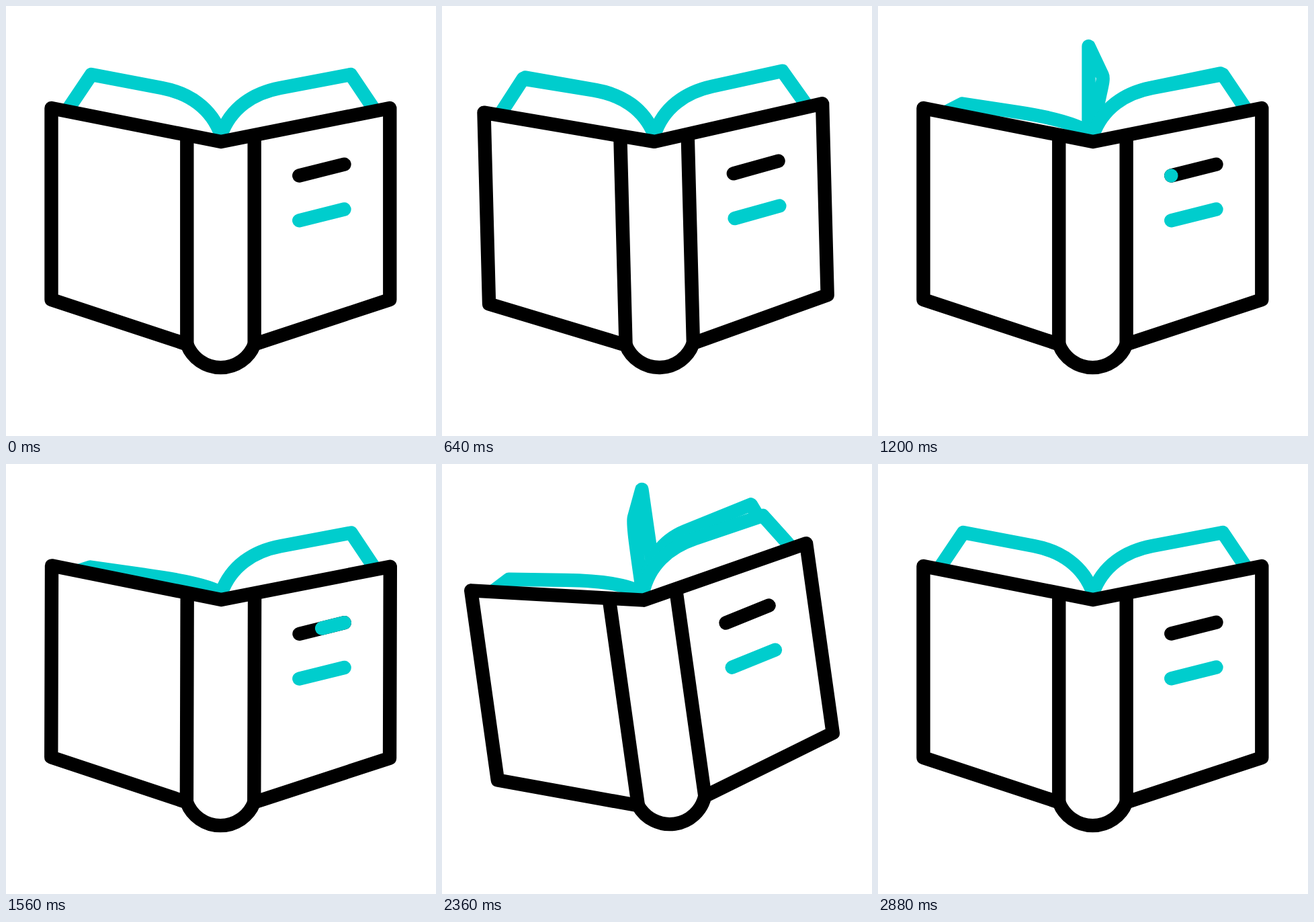
Recreate the animation shown at these times as an HTML page. Size 640 by 640 pixels, loop 3440 ms.

```html
<!DOCTYPE html>
<html lang="en">
<head>
<meta charset="utf-8">
<title>Open book</title>
<style>
  html, body { margin: 0; width: 100%; height: 100%; overflow: hidden; background: #fff; }
  svg { display: block; width: 100vw; height: 100vh; }
  path { fill: none; stroke-width: 20.4; stroke-linecap: round; stroke-linejoin: round; }
  .ink { stroke: #000; }
  .teal { stroke: #00cdcd; }
  .solid { fill: #fff; }
</style>
</head>
<body>
<svg viewBox="0 0 640 640">
  <g id="book">
    <g id="pages"></g>
    <path class="ink solid" d="M67.5 152L320 202L571.3 152V437L369.7 503.5A53.7 53.7 0 0 1 269.3 503.5L67.5 437Z"/>
    <path class="ink" d="M269.3 197V502M369.7 197V502"/>
    <path class="ink" d="M436.3 252.5L503.5 235.7"/>
    <path class="teal" d="M436.3 319.3L503.5 302.5"/>
    <path class="teal" id="sweep"/>
  </g>
</svg>
<script>
const LOOP = 3440, STEP = 40, PAGES = 4;
const SPINE = { x: 320, y: 192 };
const $ = id => document.getElementById(id);
const ease = x => x * x * (3 - 2 * x);
const span = (t, a, b) => Math.min(1, Math.max(0, (t - a) / (b - a)));
const mix = (a, b, k) => a + (b - a) * k;
const glide = (t, a, b) => ease(span(t, a, b));

// Page turns: rise of corner and elbow at the top, sharpness of each rise, sideways lean
const forward = { start: 528, gap: 120, time: 446, pace: 2,
                  corner: 42, elbow: 19, sharp: [2, 8], lean: 14 };
const back = { start: 2206, gap: 112, time: 330, pace: 1,
               corner: 64, elbow: 44, sharp: [1.3, 1.3], lean: 2 };

// Page outline at angle a: 0 lies left, PI lies right; drop lets the left side sink
function pagePath(a, drop, turn) {
  const c = Math.cos(a), s = Math.sin(a), lay = c * Math.abs(c);
  const sink = drop * Math.max(0, c) ** 4;
  const cx = SPINE.x - 193 * c - 2 * sink;
  const cy = 102 - turn.corner * s ** turn.sharp[0] + 52 * sink;
  const ex = SPINE.x - 88 * lay + turn.lean * s * s - 29 * sink;
  const ey = 122 - turn.elbow * s ** turn.sharp[1] + 43 * sink;
  const fx = cx - 37 * lay;
  const fy = 157 + 28 * s ** 8 + 9 * sink;

  // The curve leaves the elbow along the top edge and drops into the spine
  const curl = 0.2 + 0.18 * c ** 4;
  const hx = ex + curl * (ex - cx), hy = ey + curl * (ey - cy);
  const gx = mix(SPINE.x, hx, 0.3), gy = mix(SPINE.y, hy, 0.65);
  return `M${SPINE.x} ${SPINE.y}C${gx} ${gy} ${hx} ${hy} ${ex} ${ey}L${cx} ${cy}L${fx} ${fy}`;
}

function addSheet(kind) {
  const p = document.createElementNS("http://www.w3.org/2000/svg", "path");
  p.setAttribute("class", kind);
  return $("pages").appendChild(p);
}
const loose = Array.from({ length: PAGES }, () => addSheet("teal"));
const left = addSheet("teal solid"), right = addSheet("teal solid");

// Each rock eases from one angle to the next
const tilt = t =>
  -8 * glide(t, 320, 520) + 10 * glide(t, 520, 720) - 2 * glide(t, 720, 1080)
  + 2 * glide(t, 1500, 1852) - 10 * glide(t, 1852, 2360) + 8 * glide(t, 2360, 2560);

function draw(t) {
  $("book").setAttribute("transform", `rotate(${tilt(t)} 315 344)`);

  const drop = glide(t, 560, 1420) - glide(t, 2160, 2850);
  const turn = t < 1800 ? forward : back;
  left.setAttribute("d", pagePath(0, drop, turn));
  right.setAttribute("d", pagePath(Math.PI, 0, turn));

  loose.forEach((sheet, i) => {
    const from = turn.start + i * turn.gap;
    const k = span(t, from, from + turn.time);
    const a = Math.PI * (turn === forward ? k ** turn.pace : 1 - k ** turn.pace);
    sheet.setAttribute("d", k > 0 && k < 1 ? pagePath(a, drop, turn) : "");
  });

  // Teal highlight runs along the upper title line
  const at = k => mix(436.3, 503.5, k) + " " + mix(252.5, 235.7, k);
  const shown = t >= 1200 && t < 1680;
  $("sweep").setAttribute("d",
    shown ? `M${at(glide(t, 1440, 1680))}L${at(glide(t, 1200, 1440))}` : "");
}

const begin = performance.now();
function tick() {
  const t = (performance.now() - begin) % LOOP;
  draw(Math.floor(t / STEP) * STEP);
  requestAnimationFrame(tick);
}
tick();
</script>
</body>
</html>
```
